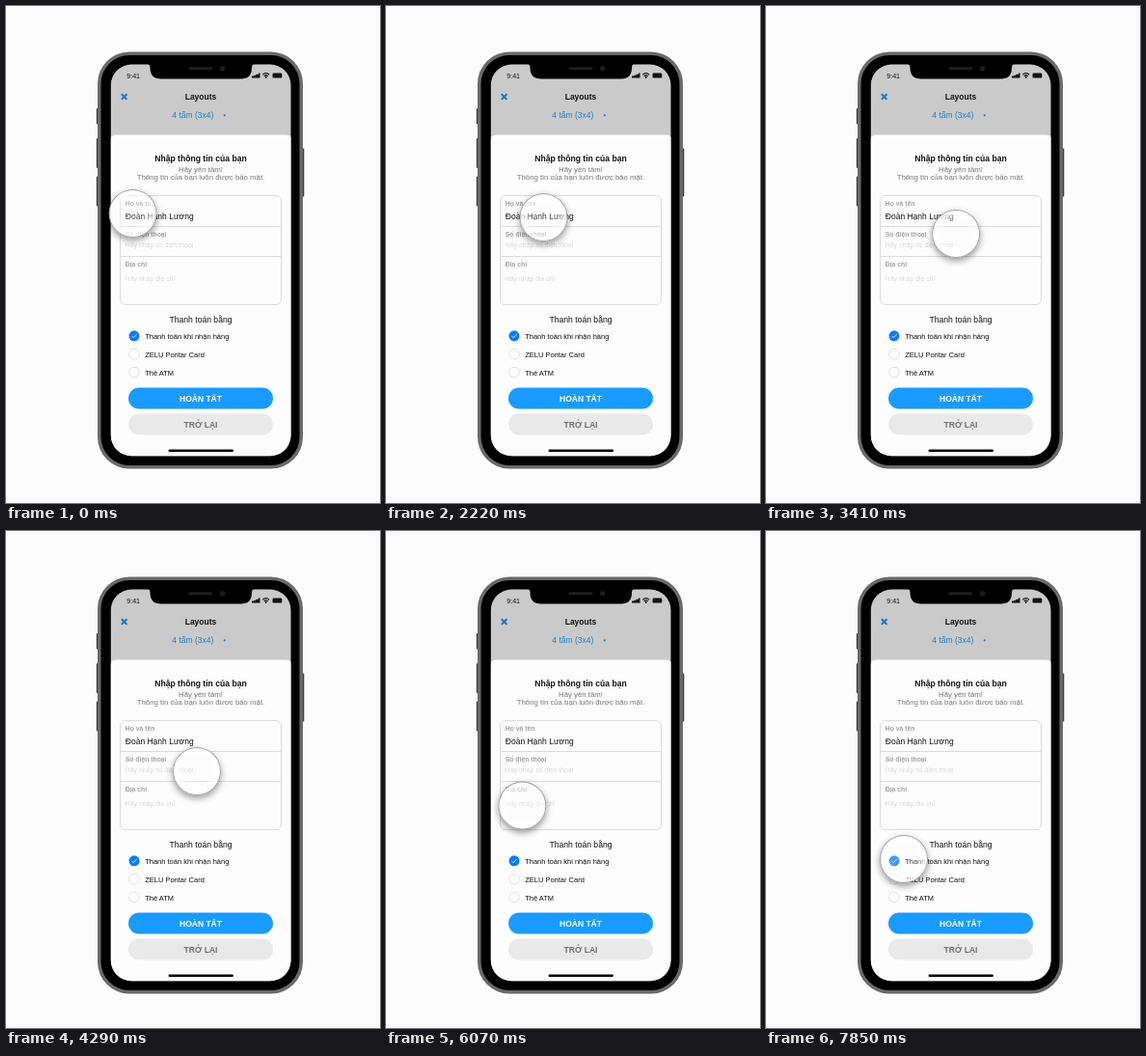
An HTML page for the animation above (8000 ms loop, 388x515 px).

```html
<!DOCTYPE html>
<html lang="vi">
<head>
<meta charset="utf-8">
<title>Form</title>
<style>
  html, body { margin: 0; width: 100%; height: 100%; overflow: hidden; background: #fcfcfc; }
  svg { position: absolute; left: 0; top: 0; display: block; }
  text { font-family: "Liberation Sans", Arial, sans-serif; font-size: 7.5px; fill: #111; }
  .bold { font-weight: 700; }
  .mid { text-anchor: middle; }
  .head { font-size: 8.5px; }
  .title { font-size: 8.6px; }
  .label { font-size: 6.8px; font-weight: 700; fill: #a2a2a2; }
  .hint { font-size: 6.9px; fill: #dadada; }
  .note { font-size: 7.8px; fill: #777; }
  .line { fill: none; stroke: #dcdcdc; }
  #lens {
    position: absolute; left: -25px; top: -25px; width: 50px; height: 50px;
    box-sizing: border-box; border-radius: 50%;
    border: 1px solid rgba(125, 125, 125, .7);
    background: radial-gradient(circle closest-side,
      rgba(255, 255, 255, .16) 0%, rgba(255, 255, 255, .24) 55%,
      rgba(255, 255, 255, .6) 82%, rgba(255, 255, 255, .9) 100%);
    box-shadow: 0 3px 7px rgba(0, 0, 0, .4);
  }
</style>
</head>
<body>
<svg width="388" height="515" viewBox="0 0 388 515">
  <defs>
    <clipPath id="screen"><rect x="108.8" y="60.5" width="186.7" height="405.7" rx="21.5"/></clipPath>
  </defs>

  <g fill="#3c3c3e">
    <rect x="93.8" y="106" width="3" height="16.5" rx="1"/>
    <rect x="93.8" y="137" width="3" height="31" rx="1"/>
    <rect x="93.8" y="176.5" width="3" height="31" rx="1"/>
    <rect x="306" y="147.5" width="3.3" height="50" rx="1"/>
  </g>
  <rect x="95" y="47.5" width="213" height="432" rx="33" fill="#6a6a6c"/>
  <rect x="98.5" y="51" width="206" height="425" rx="29.5" fill="#000"/>

  <g clip-path="url(#screen)">
    <rect x="108" y="60" width="189" height="407" fill="#cacaca"/>
    <rect x="108" y="133.5" width="189" height="350" rx="6" fill="#fdfdfd"/>
  </g>

  <path d="M146 60H258Q255 60 255 64Q255 75.5 243.5 75.5H161Q149.5 75.5 149.5 64Q149.5 60 146 60Z"/>
  <rect x="189.5" y="63.3" width="25" height="3" rx="1.5" fill="#1d1d1f"/>
  <circle cx="224.7" cy="64.8" r="2.7" fill="#1b1c22"/>

  <text x="125.3" y="75" style="font-size:7px">9:41</text>
  <g fill="#111">
    <path d="M255 74.5V72.5H257.3V71.7H259.6V70.7H261.9V69.5H263.5V74.5Z"/>
    <rect x="276.5" y="69.6" width="9.8" height="4.8" rx="1.2"/>
    <circle cx="269.7" cy="74" r=".9"/>
  </g>
  <path d="M266.3 71.2Q269.7 68.2 273.1 71.2M267.7 72.8Q269.7 71 271.7 72.8" fill="none" stroke="#111" stroke-width="1.2"/>

  <path d="M119.8 91.3l5.6 5.6m0-5.6l-5.6 5.6" stroke="#1478c4" stroke-width="2"/>
  <text class="head bold mid" x="202" y="97">Layouts</text>
  <text class="head" x="172.3" y="116" style="fill:#1b82cc">4 tấm (3x4)</text>
  <circle cx="226.8" cy="113.3" r="1.1" fill="#1b82cc"/>

  <text class="title bold mid" x="202" y="161.2">Nhập thông tin của bạn</text>
  <text class="note mid" x="202" y="171.5">Hãy yên tâm!</text>
  <text class="note mid" x="202" y="180">Thông tin của bạn luôn được bảo mật.</text>

  <rect class="line" x="118.5" y="196.5" width="167" height="113" rx="5.5"/>
  <path class="line" d="M118.5 228.5h167m-167 31h167"/>
  <text class="label" x="123.8" y="207">Họ và tên</text>
  <text class="head" x="123.8" y="221">Đoàn Hạnh Lương</text>
  <text class="label" x="123.8" y="238.7">Số điện thoại</text>
  <text class="hint" x="123.8" y="250.4">Hãy nhập số điện thoại</text>
  <text class="label" x="123.8" y="270">Địa chỉ</text>
  <text class="hint" x="123.8" y="285.4">Hãy nhập địa chỉ</text>

  <text class="title mid" x="202" y="328.3">Thanh toán bằng</text>
  <circle cx="133" cy="341.8" r="5.5" fill="#087bff"/>
  <path d="M130.5 342l1.8 1.8 3.4-4" fill="none" stroke="#fff" stroke-width=".8"/>
  <g fill="#fefefe" stroke="#dedede" stroke-width=".9">
    <circle cx="133" cy="360.7" r="5.3"/>
    <circle cx="133" cy="379.5" r="5.3"/>
  </g>
  <text x="144.2" y="344.5">Thanh toán khi nhận hàng</text>
  <text x="144.2" y="363.5">ZELU Pontar Card</text>
  <text x="144.2" y="382.5">Thẻ ATM</text>

  <rect x="127" y="395.5" width="150" height="22" rx="11" fill="#1a9bff"/>
  <text class="head bold mid" x="202" y="409.7" style="fill:#fff">HOÀN TẤT</text>
  <rect x="127" y="422.5" width="150" height="22" rx="11" fill="#e9e9e9"/>
  <text class="title bold mid" x="202" y="436.7" style="fill:#707070">TRỞ LẠI</text>
  <rect x="168.5" y="459.6" width="67.5" height="2.4" rx="1.2"/>
</svg>
<div id="lens"></div>

<script>
  const LOOP = 8000, TICK = 148;
  const easeInOut = k => k < .5 ? 4 * k ** 3 : 1 - 4 * (1 - k) ** 3;
  const easeOut = k => 1 - (1 - k) ** 5;

  // The lens glides between fields; times are in ticks
  const start = { x: 131.5, y: 215 };
  const moves = [
    { from: 0, to: 4, x: 131, y: 219, ease: easeInOut },
    { from: 9, to: 21, x: 196, y: 219, ease: easeInOut },
    { from: 22, to: 28.5, x: 198, y: 249, ease: easeOut },
    { from: 35, to: 42, x: 140.7, y: 285, ease: easeInOut },
    { from: 44, to: 51, x: 143, y: 340, ease: easeInOut }
  ];
  const lens = document.getElementById("lens");

  function position(tick) {
    return moves.reduce((p, m) => {
      const k = m.ease(Math.min(1, Math.max(0, (tick - m.from) / (m.to - m.from))));
      return { x: p.x + (m.x - p.x) * k, y: p.y + (m.y - p.y) * k };
    }, start);
  }

  function draw() {
    const time = performance.now() % LOOP;
    const { x, y } = position(Math.floor((time + 3) / TICK));
    lens.style.transform = `translate(${x}px, ${y}px)`;
    requestAnimationFrame(draw);
  }
  draw();
</script>
</body>
</html>
```
